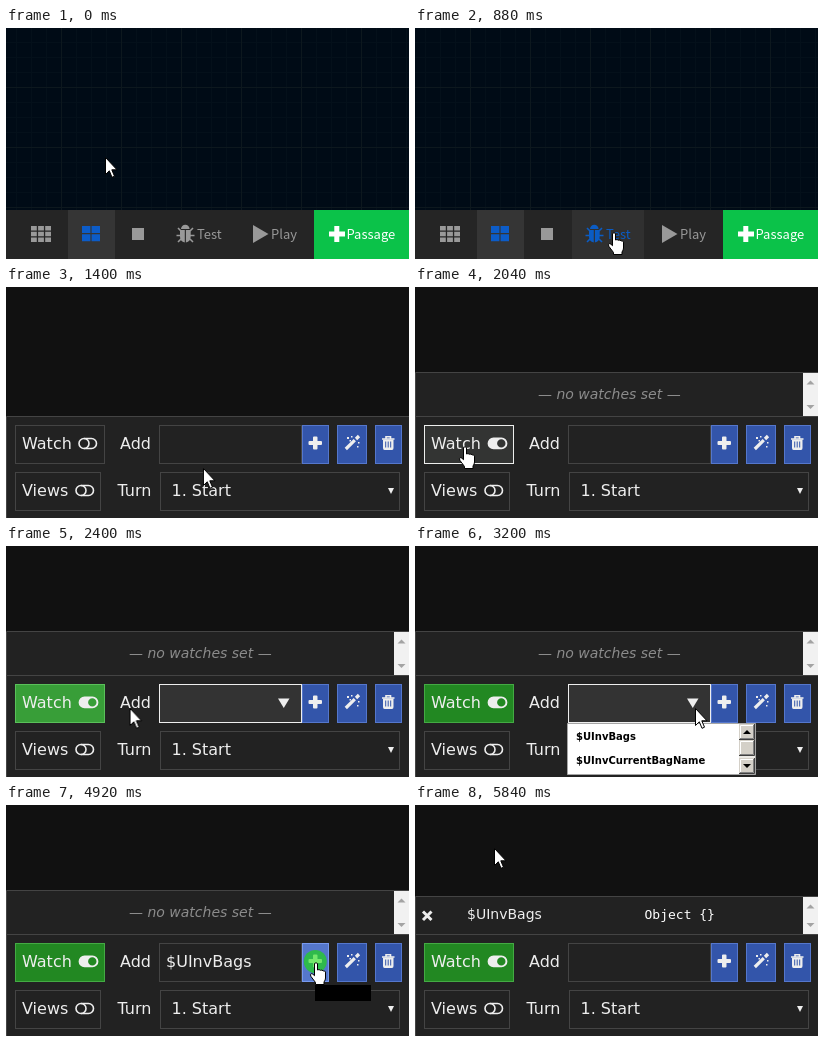
These frames come from a looping animation (403x231 px, 6000 ms). An HTML page:

```html
<!DOCTYPE html>
<html lang="en">
<head>
<meta charset="utf-8">
<title>Watching a variable in the debug bar</title>
<style>
  html, body { margin: 0; width: 100%; height: 100%; overflow: hidden; background: #111; }
  svg { display: block; width: 403px; height: 231px; }

  text { font: 16px "DejaVu Sans", sans-serif; fill: #eee; }
  .tool { font: 13px "Noto Sans CJK JP", "Noto Sans", sans-serif; fill: #999; }
  .small { font-size: 14px; }
  .note { font-style: italic; fill: #8c8c8c; }
  .mono { font: 13px "DejaVu Sans Mono", monospace; fill: #fff; }
  .option { font: bold 10px "DejaVu Sans", sans-serif; fill: #000; }
  .grey { fill: #999; }
  .box { fill: #222; stroke: #444; }
  .blue { fill: #35a; stroke: #57c; }
  .icon { fill: #eee; }
  .line { fill: none; stroke: #eee; }

  /* One shared 6 s timeline: 1% is 60 ms */
  .anim { animation: 6s linear infinite; }
  .step { animation: 6s step-end infinite; }

  #game { animation-name: game; }
  @keyframes game { 0%, 15.33% { opacity: 0 } 18.67%, 100% { opacity: 1 } }

  #test { animation-name: test; }
  #test text { fill: inherit; }
  @keyframes test {
    0% { fill: #999; stroke: #999 }
    10%, 100% { fill: #0b5cc4; stroke: #0b5cc4 }
  }
  #testBack { animation-name: testBack; }
  @keyframes testBack { 0% { opacity: 0 } 10%, 100% { opacity: 1 } }

  #watch { animation-name: watch; }
  @keyframes watch {
    0%, 28.6% { fill: #222; stroke: #444 }
    32%, 34% { fill: #333; stroke: #eee }
    37.3%, 38.8% { fill: #4a4; stroke: #6c6 }
    42.2%, 100% { fill: #282; stroke: #4a4 }
  }
  #off { animation-name: off; }
  @keyframes off { 0% { opacity: 1 } 34%, 100% { opacity: 0 } }
  #on { animation-name: on; }
  @keyframes on { 0% { opacity: 0 } 34%, 100% { opacity: 1 } }

  #empty { animation-name: empty; }
  @keyframes empty { 0% { opacity: 0 } 33.95% { opacity: 1 } 83.3%, 100% { opacity: 0 } }
  #filled { animation-name: filled; }
  @keyframes filled { 0% { opacity: 0 } 83.3%, 100% { opacity: 1 } }

  #field { animation-name: field; }
  @keyframes field {
    0%, 24.7% { fill: #222; stroke: #444 }
    28% { fill: #333; stroke: #eee }
    31.5%, 38% { fill: #222; stroke: #444 }
    40%, 77.7% { fill: #333; stroke: #eee }
    81%, 89.6% { fill: #222; stroke: #444 }
    91% { fill: #2a2a2a; stroke: #999 }
    94%, 100% { fill: #222; stroke: #444 }
  }
  #drop { animation-name: drop; }
  @keyframes drop {
    0%, 28.2%, 68.6%, 77.7%, 90.7%, 100% { opacity: 0 }
    24.7%, 39%, 74.7%, 89.6% { opacity: 1 }
  }
  #value { animation-name: value; }
  @keyframes value { 0% { opacity: 0 } 68.6% { opacity: 1 } 83.3%, 100% { opacity: 0 } }

  #list { animation-name: list; }
  @keyframes list { 0% { opacity: 0 } 53.3% { opacity: 1 } 68.6%, 100% { opacity: 0 } }
  #pick { animation-name: pick; }
  @keyframes pick { 0% { opacity: 0 } 62.65%, 100% { opacity: 1 } }

  #add { animation-name: add; }
  @keyframes add {
    0%, 77.7% { fill: #35a; stroke: #57c }
    81%, 89.6% { fill: #57c; stroke: #79e }
    92.9%, 100% { fill: #35a; stroke: #57c }
  }
  #press { animation-name: press; }
  @keyframes press { 0% { opacity: 0 } 80.6% { opacity: 1 } 82.6%, 100% { opacity: 0 } }

  #pointer { animation-name: move; animation-timing-function: ease-in-out; }
  @keyframes move {
    0%, 4% { transform: translate(99px, 129px) }
    14%, 15.33% { transform: translate(199px, 205px) }
    18.67%, 23.2% { transform: translate(197px, 181px) }
    32% { transform: translate(50px, 160px) }
    36% { transform: translate(50px, 160px); animation-timing-function: ease-in }
    40% { transform: translate(123px, 162px); animation-timing-function: linear }
    44% { transform: translate(244px, 158px); animation-timing-function: ease-out }
    46.67%, 48.67% { transform: translate(276px, 166px) }
    50.67%, 59.5% { transform: translate(280px, 162px) }
    65.3%, 72.2% { transform: translate(212px, 186px) }
    79.3%, 87.5% { transform: translate(310px, 158px) }
    97.3%, 100% { transform: translate(79px, 43px) }
  }
  #arrow { animation-name: arrow; }
  @keyframes arrow {
    0%, 16.7%, 26.5%, 39%, 45%, 62.7%, 76.7%, 89.6%, 100% { opacity: 1 }
    10%, 24.8%, 28.8%, 41%, 61.3%, 74.7%, 77.7% { opacity: 0 }
  }
  #hand { animation-name: hand; }
  @keyframes hand {
    0%, 16.7%, 39%, 89.6%, 100% { opacity: 0 }
    10%, 28.8%, 77.7% { opacity: 1 }
  }
  #beam { animation-name: beam; }
  @keyframes beam {
    0%, 26.5%, 45%, 62.7%, 76.7%, 100% { opacity: 0 }
    24.8%, 41%, 61.3%, 74.7% { opacity: 1 }
  }
</style>
</head>
<body>
<svg viewBox="0 0 403 231">
  <defs>
    <pattern id="minor" x="55" y="59" width="15" height="15" patternUnits="userSpaceOnUse">
      <path d="M.5 0V15M0 .5H15" stroke="#04101a"/>
    </pattern>
    <pattern id="major" x="55" y="59" width="60" height="60" patternUnits="userSpaceOnUse">
      <path d="M.5 0V60M0 .5H60" stroke="#0d181e"/>
    </pattern>
    <g id="toggleOff" class="line" stroke-width="1.6">
      <circle cx="6" cy="5.500" r="5"/>
      <path d="M6 .5h7.500a5 5 0 0 1 0 10H6"/>
    </g>
    <path id="plus" d="M5 0h3q1 0 1 1v3.500h3.500q1 0 1 1v2q0 1-1 1H9V12q0 1-1 1H5.500q-1 0-1-1V8.500H1q-1 0-1-1v-2q0-1 1-1h3.500V1q0-1 1-1z"/>
    <g id="bevel" fill="none">
      <path fill="#d4d0c8" d="M0 0h16v16H0z"/>
      <path stroke="#fff" d="M1.500 14V1.500H14"/>
      <path stroke="#808080" d="M1 14.500h13.500V1"/>
      <path stroke="#404040" d="M0 15.500h15.500V0"/>
    </g>
    <path id="scrollUp" fill="#a3a3a3" d="M391.500 4.500l4-4 4 4z"/>
    <path id="scrollDown" fill="#a3a3a3" d="M391.500 118l4 4 4-4z"/>
  </defs>

  <!-- Story editor -->
  <g id="editor">
    <path fill="#000b16" d="M0 0h403v182H0z"/>
    <path fill="url(#minor)" d="M0 0h403v182H0z"/>
    <path fill="url(#major)" d="M0 0h403v182H0z"/>
    <path fill="#252525" d="M0 182h403v49H0z"/>
    <path fill="#353535" d="M62 182h47v49H62z"/>
    <path id="testBack" class="step" fill="#303030" d="M157 182h72v49h-72z"/>
    <path fill="#0bc249" d="M308 182h95v49h-95z"/>

    <path stroke="#999" stroke-width="4.6" stroke-dasharray="5.8 1.3" d="M25 200.300h20M25 206h20M25 211.700h20"/>
    <path stroke="#0c5cc8" stroke-width="7" stroke-dasharray="8.4 1.2" d="M76 201.500h18M76 209.700h18"/>
    <path class="grey" d="M126 200h12v12h-12z"/>
    <g id="test" class="step">
      <path stroke="none" d="M175 201a4.300 4.300 0 0 1 8.600 0zM174 202h4.800v12.500q-4.800-.8-4.800-6zM179.900 202h4.800v6.500q0 5.200-4.800 6z"/>
      <path fill="none" stroke-width="1.600" d="M175 203l-3-3M184 203l3-3M175 207.500h-4.500M184 207.500h4.500M175 211l-3 3M184 211l3 3"/>
      <text class="tool" stroke="none" x="191" y="211">Test</text>
    </g>
    <path class="grey" d="M247 197l15.500 9-15.500 9z"/>
    <text class="tool" x="265" y="211">Play</text>
    <path fill="#fff" d="M328.300 198h5v5.500h5.700v5h-5.700v5.500h-5v-5.500h-5.300v-5h5.300z"/>
    <text class="tool" x="340.500" y="211" style="fill:#fff">Passage</text>
  </g>

  <!-- Running story with debug bar -->
  <g id="game" class="anim">
    <path fill="#111" d="M0 0h403v231H0z"/>

    <g id="empty" class="step">
      <path class="box" d="M.5 85.500H404V140H.5z"/>
      <text class="small note" x="123" y="112">— no watches set —</text>
      <path fill="#f1f1f1" d="M388 86h15v43h-15z"/>
      <use href="#scrollUp" y="93"/>
      <use href="#scrollDown"/>
    </g>
    <g id="filled" class="step">
      <path class="box" d="M.5 91.500H404V140H.5z"/>
      <path class="line" stroke-width="3" d="M8 106.500l8.500 8.500M16.500 106.500L8 115"/>
      <text class="small" x="52" y="114">$UInvBags</text>
      <text class="mono" x="229.500" y="114">Object {}</text>
      <path fill="#f1f1f1" d="M388 92h15v37h-15z"/>
      <use href="#scrollUp" y="99"/>
      <use href="#scrollDown"/>
    </g>

    <path class="box" d="M.5 232V129.500H404V232z"/>

    <rect id="watch" class="anim" x="9.500" y="138.500" width="89" height="38"/>
    <text x="16" y="162">Watch</text>
    <g id="off" class="step"><use href="#toggleOff" x="72" y="151"/></g>
    <g id="on" class="step">
      <path class="icon" fill-rule="evenodd" d="M78.500 150.500h8a5.900 5.900 0 0 1 0 11.800h-8a5.900 5.900 0 0 1 0-11.800zM86.300 152.200a4.200 4.200 0 0 0 0 8.400 4.200 4.200 0 0 0 0-8.400z"/>
    </g>

    <text x="114" y="162">Add</text>
    <rect id="field" class="anim" x="153.500" y="138.500" width="142" height="38"/>
    <text id="value" class="step" x="160" y="162">$UInvBags</text>
    <path id="drop" class="step icon" d="M272 152.500h11.500l-5.750 9.500z"/>

    <rect id="add" class="anim" x="296.500" y="138.500" width="26" height="38"/>
    <use href="#plus" class="icon" x="302.500" y="149.500"/>

    <rect class="blue" x="331.500" y="138.500" width="29" height="38"/>
    <path class="line" stroke-width="3.200" d="M339.800 162l9-8.800M350 152l3-3"/>
    <path class="icon" d="M341 150h2v2h-2zM345 149h1.500v1.500H345zM343.500 153h1.500v1.500h-1.500zM352 155h1.500v1.500H352zM351 159h1.500v1.500H351z"/>

    <rect class="blue" x="369.500" y="138.500" width="26" height="38"/>
    <path class="line" stroke-width="1.600" d="M376 152h12.500M380 151.500v-1.700h4.500v1.700"/>
    <path class="icon" d="M377 152.500h10.500V161q0 2-1.500 2h-7.500q-1.500 0-1.500-2z"/>
    <path stroke="#35a" d="M379.700 154.500v6M382.200 154.500v6M384.700 154.500v6"/>

    <rect class="box" x="9.500" y="185.500" width="85" height="38"/>
    <text x="16" y="209">Views</text>
    <use href="#toggleOff" x="69" y="198"/>
    <text x="111.500" y="209">Turn</text>
    <rect class="box" x="154.500" y="185.500" width="239" height="38"/>
    <text x="165.500" y="209">1. Start</text>
    <path class="icon" d="M382 201h6l-3 6z"/>

    <g id="list" class="step">
      <path fill="#fff" stroke="#a5a5a5" d="M152.500 177.500h188v51h-188z"/>
      <path id="pick" class="step" fill="#c1c5da" d="M153 178h171v24H153z"/>
      <text class="option" x="161" y="194">$UInvBags</text>
      <text class="option" x="161" y="218">$UInvCurrentBagName</text>
      <path fill="#eceae6" d="M324 178h16v50h-16z"/>
      <use href="#bevel" x="324" y="178"/>
      <use href="#bevel" x="324" y="194"/>
      <use href="#bevel" x="324" y="212"/>
      <path d="M328 188l4-4 4 4zM328 218l4 4 4-4z"/>
    </g>

    <g id="press" class="step">
      <circle cx="309.300" cy="156.500" r="11.500" fill="#2fba4c"/>
      <use href="#plus" fill="#74e86c" x="302.500" y="149.500"/>
      <path d="M309 180h56v16h-56z"/>
    </g>
  </g>

  <g id="pointer" class="anim" fill="#fff" stroke="#000">
    <path id="arrow" class="step" d="M.5.500V17.500l3.800-3.700 2.700 6.500 2.500-1.100-2.700-6.400H12z"/>
    <path id="hand" class="step" d="M-1.500.500q1.500-1.500 3 0V7q1.500-1 3 .3 1.500-.7 2.700.6 1.700-.5 2.300 1.200V15q0 2-1.500 4v2.500H-.5v-2L-5 13.500q-1.300-2.200.3-2.800 1.300-.2 3.200 2z"/>
    <path id="beam" class="step" fill="none" stroke="#eee" d="M-3-7.500h2.500q.5 0 .5 1v13q0 1-.5 1H-3M3-7.500H.5q-.5 0-.5 1M3 7.500H.5q-.5 0-.5-1"/>
  </g>
</svg>
</body>
</html>
```
